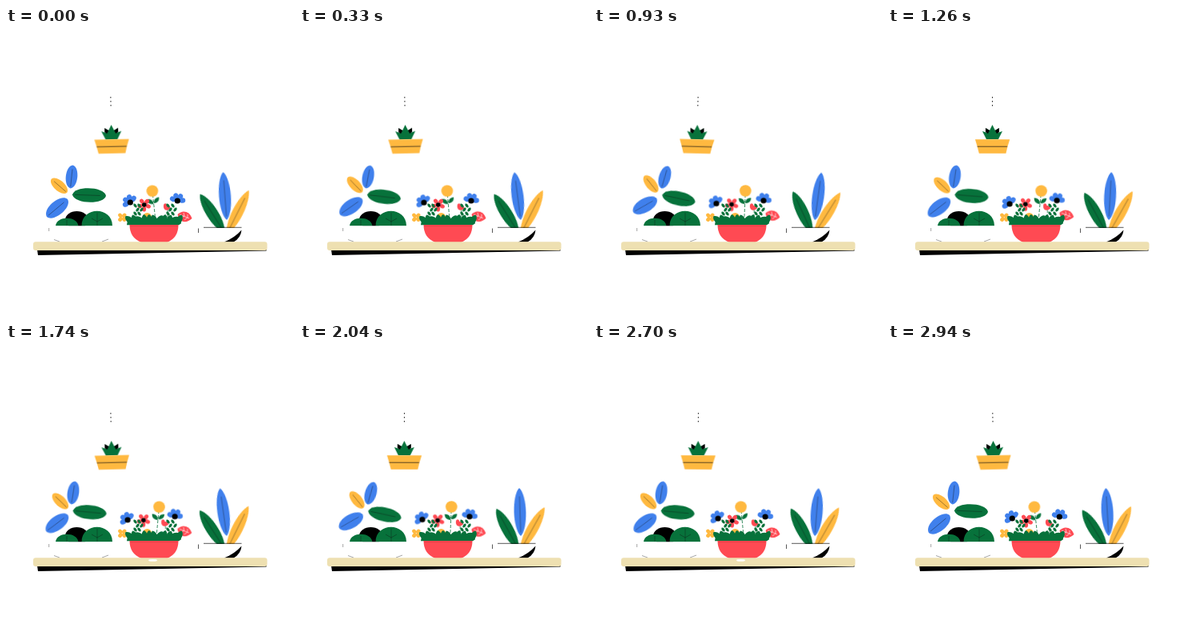
Animation of 360x360 px, one loop 2970 ms. Source, as an HTML page:

```html
<!DOCTYPE html>
<html lang="en">
<head>
<meta charset="utf-8">
<title>Plants on a shelf</title>
<style>
  html, body { margin: 0; width: 100%; height: 100%; overflow: hidden; background: #fff; }
  svg { display: block; width: 100vw; height: 100vh; }

  .sway, .drift { animation: sway 742.5ms cubic-bezier(.37, 0, .63, 1) infinite alternate; }
  .slow { animation-duration: 1485ms; }
  .drift { animation-name: drift; animation-duration: 1485ms; }

  .hanging { --a: -1.5deg; --b: 1.5deg; transform-origin: 130.8px 70px; animation-delay: -1328ms; }
  .fan { --a: 0deg; --b: 12deg; transform-origin: 82px 222px; }
  .tall { --a: -8deg; --b: 8deg; transform-origin: 275px 241px; animation-delay: -1246ms; }
  .left { --a: -4.2deg; --b: 4.2deg; transform-origin: 271px 252px; animation-delay: -1320ms; }
  .right { --a: -3deg; --b: 3deg; transform-origin: 276px 252px; animation-delay: -1320ms; }
  .sun { --a: -6.2deg; --b: 6.2deg; transform-origin: 187.5px 246px; }
  .glint { animation: glint 990ms step-end infinite; }

  @keyframes sway { from { transform: rotate(var(--a)); } to { transform: rotate(var(--b)); } }
  @keyframes drift { to { transform: translate(var(--x), var(--y)); } }
  @keyframes glint { 0%, 90% { opacity: 0; } 36% { opacity: 1; } }

  .green { fill: #07723b; }
  .blue { fill: #4080ec; }
  .yellow { fill: #ffb940; }
  .red { fill: #ff4a53; }
  .white { fill: #fff; }
  .line { fill: none; stroke: #111; stroke-width: .7; }
  .vein { fill: none; stroke: #111; stroke-width: .5; opacity: .75; }
  .stem { fill: none; stroke: #07723b; stroke-width: .8; stroke-dasharray: 4 2; }
</style>
</head>
<body>
<svg viewBox="0 0 360 360">
  <g class="sway hanging">
    <path d="M130.500 86V99" fill="none" stroke="#111" stroke-dasharray="1.500 3.500"/>
    <path class="green" d="M118 129l6 2-2-6 5 3 3.500-7 3.500 7 5-3-2 6 6-2-5 10h-15z"/>
    <path d="M122 125l5 3-2 4-3-2zM139 125l-5 3 2 4 3-2z"/>
    <path class="yellow" d="M109 139.300h43.300l-2.800 9-2 8.400h-33.600l-2.200-8.400z"/>
    <path class="line" d="M111.700 148.200h37.500"/>
  </g>

  <g id="fan" class="sway fan"></g>

  <ellipse cx="88.500" cy="240" rx="14.500" ry="11"/>
  <path class="green" d="M62 247.500c1-13 27-13 28.500 0zM94.500 247.500c0-25 38.500-25 38.500 0z"/>
  <path class="vein" d="M114 231v16M76 240v7M107 238l7 4 7-4"/>
  <path class="white" d="M54 247.300h79.500q-1 16-11 20H66q-11-4-12-20z"/>
  <path class="vein" d="M53.700 250v4M60 264.500l7 2.500M120 267l8-3"/>

  <g id="trio"></g>
  <path class="white" d="M241 250h54q-1 13-20 18h-14q-18-5-20-18z"/>
  <path d="M294.500 252.500q-1 10-10 15h-12q13-5 22-15z"/>
  <path class="line" d="M247 249.300h47.500M240.500 250.500v5.500"/>

  <circle class="yellow" cx="176.500" cy="236.500" r="5.500"/>
  <g class="drift" style="--x:-3px;--y:0px">
    <path class="stem" d="M202 227q1 8-2 16"/>
    <path class="red" d="M197.500 220q3-2 4 2 4 0 4.500 3.500-5 4-8 1-2-3-.5-6.500z"/>
  </g>
  <g class="sway slow sun">
    <path class="stem" d="M187.500 208V244"/>
    <circle class="yellow" cx="187.500" cy="203.500" r="7.300"/>
    <path class="green" d="M187.500 220q-8 0-8-7 7-1 8 7zM188 219q0-7 7-7 0 7-7 7z"/>
  </g>
  <g id="blueLeft" class="drift" style="--x:-3.500px;--y:2px"></g>
  <g id="redBloom" class="drift" style="--x:-1px;--y:-.8px"></g>
  <g id="blueRight" class="drift" style="--x:-3.500px;--y:-.4px"></g>
  <g id="gold"></g>
  <g class="drift" style="--x:-.3px;--y:-2px">
    <path class="red" d="M214.500 233q5-5 11-3 5 2 7 8-5 5-11 4-6-2-7-9z"/>
    <path d="M217 233l12 5M222 231l1 4-4 2M227 233v4l-4 3" fill="none" stroke="#fff" stroke-width=".6"/>
  </g>
  <g id="foliage"></g>

  <path class="red" d="M154.500 246H215.500q0 16-14 22H169q-14.500-6-14.500-22z"/>
  <path d="M155 247.300h60" stroke="#c92f37" stroke-width=".5"/>

  <path d="M39 277h286.500v1.500L40 284z"/>
  <rect x="34" y="267.300" width="292.500" height="10.700" rx="3" fill="#eee0b1"/>
  <ellipse class="white glint" cx="183.500" cy="270.400" rx="5.500" ry="1.300"/>
</svg>

<script>
  const $ = id => document.getElementById(id);
  const repeat = (n, draw) => Array.from({ length: n }, (_, i) => draw(i)).join('');

  // round: 0 gives a pointed blade, 1 an oval
  function blade(x, y, len, wide, turn, color, round, extra = '') {
    const c = wide * 1.34, k = len * (.5 + round * .48);
    return `<g transform="translate(${x} ${y}) rotate(${turn})">
      <path class="${color}" d="M0 ${-len}C${c} ${-k} ${c} ${k} 0 ${len}C${-c} ${k} ${-c} ${-k} 0 ${-len}"/>${extra}</g>`;
  }

  function leaf(x, y, len, wide, turn, color, round) {
    const vein = `<path class="vein" d="M0 ${-len * .65}V${len * .85}"/>`;
    return blade(x, y, len, wide, turn, color, round, vein);
  }

  // Petals fanned around a centre, beginning at angle `start`
  function bloom(x, y, color, { n, reach, size, start = 0, step = 360 / n, eye = 0 }) {
    return repeat(n, i => `<ellipse class="${color}" cx="${reach}" rx="${size}" ry="${size * .8}"
        transform="translate(${x} ${y}) rotate(${start + i * step})"/>`) +
      `<circle cx="${x}" cy="${y}" r="${eye}"/>`;
  }

  const sway = (name, art) => `<g class="sway ${name}">${art}</g>`;

  $('fan').innerHTML =
    leaf(82, 186, 14.5, 7.2, 6, 'blue', .8) +
    leaf(66.5, 197.3, 13, 6.4, -49, 'yellow', .8) +
    leaf(104, 209, 21, 8.7, 92, 'green', .8) +
    leaf(64, 225, 17, 8.6, 50, 'blue', .8);

  $('trio').innerHTML =
    sway('left', leaf(259, 231, 28.5, 7.2, -29, 'green', .3)) +
    sway('right', leaf(290.5, 231, 31, 6.8, 29, 'yellow', .15)) +
    sway('tall', leaf(276, 210, 30, 7.4, 0, 'blue', .4));

  const wide = { n: 4, reach: 6, size: 4, step: 51, eye: 3.6 };
  $('blueLeft').innerHTML = bloom(155.3, 218, 'blue', { ...wide, start: 157 });
  $('blueRight').innerHTML = bloom(214.3, 216, 'blue', { ...wide, start: 202 });
  $('redBloom').innerHTML = bloom(172.8, 221, 'red', { n: 5, reach: 5.3, size: 3.2, start: 20, eye: 2.8 });
  $('gold').innerHTML = bloom(145.3, 236.8, 'yellow', { n: 4, reach: 3.4, size: 3, start: -45 });

  const sprig = x => repeat(3, i =>
    blade(x + (i % 2 ? 1.5 : -1.5), 222 + i * 5, 3, 1.7, i % 2 ? 35 : -35, 'green', .6));
  const hedge = repeat(11, i =>
    blade(154.5 + i * 6.2, 240, 7, 3.6, -50 + i * 10 + 25 * Math.sin(i * 2.3), 'green', .3));

  $('foliage').innerHTML = [163, 168, 204, 210].map(sprig).join('') + hedge +
    '<path class="green" d="M151 246.2l1-6q33-4 66 0l1 4-3 2z"/>';
</script>
</body>
</html>
```
